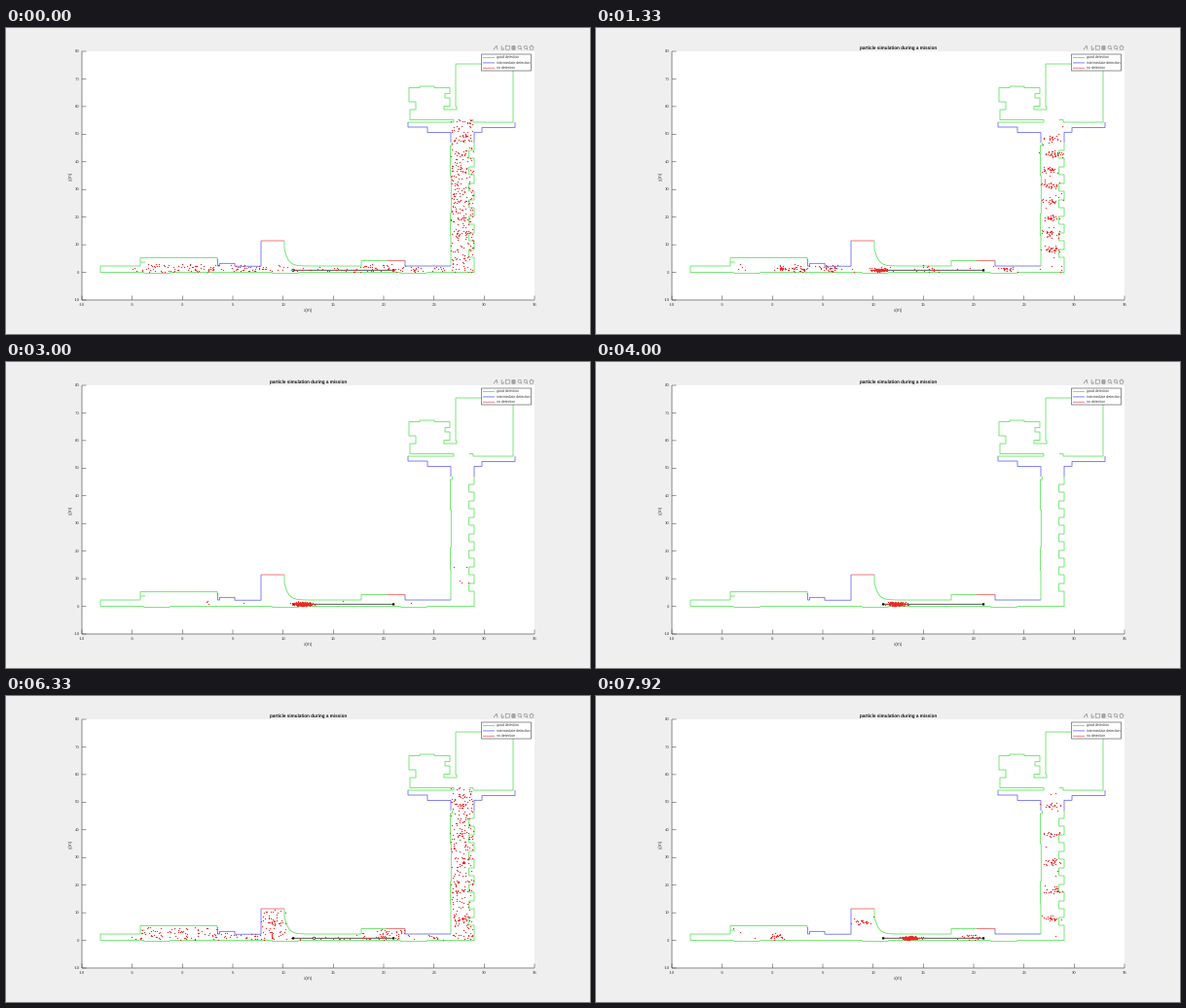
A matplotlib script for the animation above (8 s loop, 600 by 315 pixels).

```python
import numpy as np
import matplotlib.pyplot as plt
from matplotlib.animation import FuncAnimation
from matplotlib.patches import Circle, Rectangle

plt.rcParams.update({
    "font.family": "Liberation Sans",
    "text.hinting": "none",
    "path.snap": False,
    "toolbar": "None",
})

W, H, DPI = 600, 315, 100
FPS, SECONDS, HOLD = 12, 8, 6      # HOLD: frames per simulation step
PX = 72 / DPI                      # points per pixel
LEFT, RIGHT, TOP, BOTTOM = 78, 543, 24, 280
FLOOR, RESTART = 251.5, 12         # RESTART: step of the second run
GREEN, BLUE, RED, INK = "#4fe04f", "#5a5af0", "#f05050", "#3c3c3c"

fig = plt.figure(figsize=(W / DPI, H / DPI), dpi=DPI, facecolor="#efefef")
ax = fig.add_axes([0, 0, 1, 1])
ax.set_xlim(0, W)
ax.set_ylim(H, 0)
ax.axis("off")


def line(xs, ys, color, width=0.75, z=2):
    ax.plot(xs, ys, color=color, lw=width * PX, zorder=z,
            solid_joinstyle="miter", solid_capstyle="butt")


def wall(color, x, y, *stops, width=0.75, z=2):
    """Right-angled outline: stops give the next y, then x, in turn."""
    xs, ys = [x], [y]
    for i, stop in enumerate(stops):
        xs.append(stop if i % 2 else xs[-1])
        ys.append(ys[-1] if i % 2 else stop)
    line(xs, ys, color, width, z)


def label(x, y, text, size, ha="center", **kw):
    kw = {"va": "center", "color": INK, "zorder": 8, **kw}
    return ax.text(x, y, text, fontsize=size * PX, ha=ha, **kw)


def rect(x, y, w, h, face, edge="none", z=1):
    ax.add_patch(Rectangle((x, y), w, h, fc=face, ec=edge, lw=0.6 * PX,
                           zorder=z))


def draw_axes():
    rect(LEFT, TOP, RIGHT - LEFT, BOTTOM - TOP, "white")
    wall(INK, LEFT, TOP, BOTTOM, RIGHT, width=0.6)
    for i in range(10):
        x = LEFT + i * (RIGHT - LEFT) / 9
        y = BOTTOM - i * (BOTTOM - TOP) / 9
        line([x, x], [BOTTOM, BOTTOM - 4.5], INK, 0.5)
        line([LEFT, LEFT + 4.5], [y, y], INK, 0.5)
        label(x, 285.2, str(5 * i - 10), 4.2)
        label(75.5, y, str(10 * i - 10), 4.2, ha="right")
    label(311, 291, "x(m)", 4.6)
    label(66.5, 152, "y(m)", 4.6, rotation=90)


def draw_walls():
    # left wing
    wall(GREEN, 97, FLOOR, 245, 138, 236.5, 217, 239)
    line([138, 143], [241, 241], GREEN)
    wall(BLUE, 217.5, 238, 245, 219.5, 242.3, 235, 245.2, 262, 219)
    wall(RED, 262, 219, 219, 286)
    xs = np.linspace(286, 310, 30)
    line([286, *xs], [219, *(245 - 18 * np.exp((286 - xs) / 4))], GREEN)
    wall(GREEN, 310, 245, 245, 365, 239.4, 391)
    wall(RED, 391, 239.4, 239.4, 410)
    wall(BLUE, 410, 239.4, 245, 457)

    # floor with shallow dips
    xs = np.arange(97, 482)
    line(xs, FLOOR + (np.sin(xs / 21 - 5.8) > 0.8), GREEN)

    # corridor: plain left side, evenly spaced ledges on the right
    wall(GREEN, 457, 245, 214, 456.4, 191, 457.3, 152, 456.4, 121, 458.5, 118)
    ledges = [v for y in range(126, 235, 17) for v in (y, 475.7, y + 8, 481)]
    wall(GREEN, 481, 118, *ledges, 252)

    # upper rooms
    wall(BLUE, 457, 118, 107.5, 433, 102, 413, 97)
    wall(GREEN, 413, 97, 97, 460, 94.5, 415, 84, 421, 76, 414, 61.5, 425, 60,
         440, 61.5, 456, 67.5, 451, 72, 456, 80.5, 450, 84, 463, 81, 462, 37,
         521, 97, 480, 94.5, 476)
    wall(BLUE, 523, 97, 102.5, 489, 107.3, 481, 118)


def draw_legend():
    rect(488.5, 27, 51, 17, "white", "#4a4a4a", z=6)
    rows = (("good detection", GREEN), ("intermediate detection", BLUE),
            ("no detection", RED))
    for i, (text, color) in enumerate(rows):
        y = 30.6 + 5.3 * i
        line([490, 502], [y, y], color, z=7)
        label(503.5, y, text, 3.5, ha="left")


def draw_toolbar():
    grey, y = "#858585", 20.2
    brush, tip, save, hand, zoom_in, zoom_out, home = 503 + 6.15 * np.arange(7)
    line([brush - 2, brush + 1, brush + 2], [y + 2, y - 2, y + 2], grey, 0.7)
    wall(grey, tip, y - 2, y + 2, tip + 2, y, width=0.7)
    rect(save - 2, y - 2, 4, 4, "none", grey, 3)
    rect(hand - 1.6, y - 1.5, 3.2, 3.5, "#a8a8a8", grey, 3)
    for x in (zoom_in, zoom_out):
        ax.add_patch(Circle((x, y - 0.4), 1.6, fc="none", ec=grey,
                            lw=0.6 * PX, zorder=3))
        line([x + 1.1, x + 2.4], [y + 0.8, y + 2.2], grey, 0.7)
    line([home - 2.4, home, home + 2.4], [y, y - 2.3, y], grey, 0.7)
    wall(grey, home - 1.5, y, y + 2, home + 1.5, y, width=0.6)


def draw_path():
    line([295, 398], [249.3, 249.3], "#303030", 0.8, 3)
    for x in (295, 398):
        rect(x - 1, 248.3, 2.2, 2.2, "black", z=3)


# Height of the ceiling between these x positions
EDGES = (138, 218, 262, 287, 365, 410, 457)
CEILING = np.array([247, 238, 244, 220, 246, 240, 246, 94])


def vehicle_x(step):
    return 295 + 1.8 * max(step, 0)


def scatter_inside(rng, n, second):
    """Uniform points under the ceiling; the first run stays near the floor."""
    dots = rng.uniform((128, 94), (480, 251), (15000, 2))
    top = CEILING[np.searchsorted(EDGES, dots[:, 0])]
    if not second:
        top = np.where(dots[:, 0] < EDGES[-1], np.maximum(top, 243), top)
    return dots[dots[:, 1] > top][:n]


def clump_centres(second):
    gap, floor = (29, (185, 385)) if second else (16.4, (190, 209, 241, 343, 420))
    centres = [(468, y) for y in np.arange(113, 240, gap)]
    centres += [(x, 247.5) for x in floor]
    return np.array(centres + [(274, 233)] * second)


def cloud(step):
    rng = np.random.default_rng(step + 40)
    second = step >= RESTART
    age = max(step - RESTART * second, 0)
    spread = round(500 * np.exp(-1.15 * age))
    clumped = round(330 * np.exp(-(age - 2) ** 2 / 3))
    near = round(300 * (1 - np.exp(-(age / 3) ** 2)))

    centres = clump_centres(second)
    clumps = centres[rng.integers(len(centres), size=clumped)]
    clumps = clumps + rng.normal(0, (4.5, 1.7), (clumped, 2))
    lag = 9 * np.exp(-(max(step, 0) / 3) ** 4)
    truth = rng.normal((vehicle_x(step) - lag, 249), (4.2, 0.9), (near, 2))
    dots = np.vstack([scatter_inside(rng, spread, second), clumps, truth])
    dots = np.clip(dots, 128, (480, 251)) if not len(dots) else dots
    dots[:, 0] = np.minimum(dots[:, 0], 480)
    dots[:, 1] = np.minimum(dots[:, 1], 251)
    return dots, rng.random(len(dots))


draw_axes()
draw_walls()
draw_path()
draw_legend()
draw_toolbar()
title = label(311, 20.3, "particle simulation during a mission", 4.6,
              weight="bold", color="#111111")

clouds = {step: cloud(step) for step in range(-1, 17)}
particles = ax.scatter([], [], s=(1.3 * PX) ** 2, c="#f02828", lw=0, zorder=5)
vehicle = ax.add_patch(Circle((295, 249.3), 1.2, fc="white", ec="black",
                              lw=0.6 * PX, zorder=4))


def update(i):
    step, phase = divmod(i + 2, HOLD)
    mix = min(1, (phase + 1) / 5)
    # each particle swaps to its new place at its own moment
    (old, leave), (new, arrive) = clouds[step - 1], clouds[step]
    particles.set_offsets(np.vstack([old[leave >= mix], new[arrive < mix]]))
    x0, x1 = vehicle_x(step - 1), vehicle_x(step)
    vehicle.center = (x0 + (x1 - x0) * mix, 249.3)
    title.set_alpha(min(1, i / 2))
    return particles, vehicle, title


anim = FuncAnimation(fig, update, frames=FPS * SECONDS, interval=1000 / FPS,
                     repeat=True, repeat_delay=0, blit=False)
plt.show()
```
